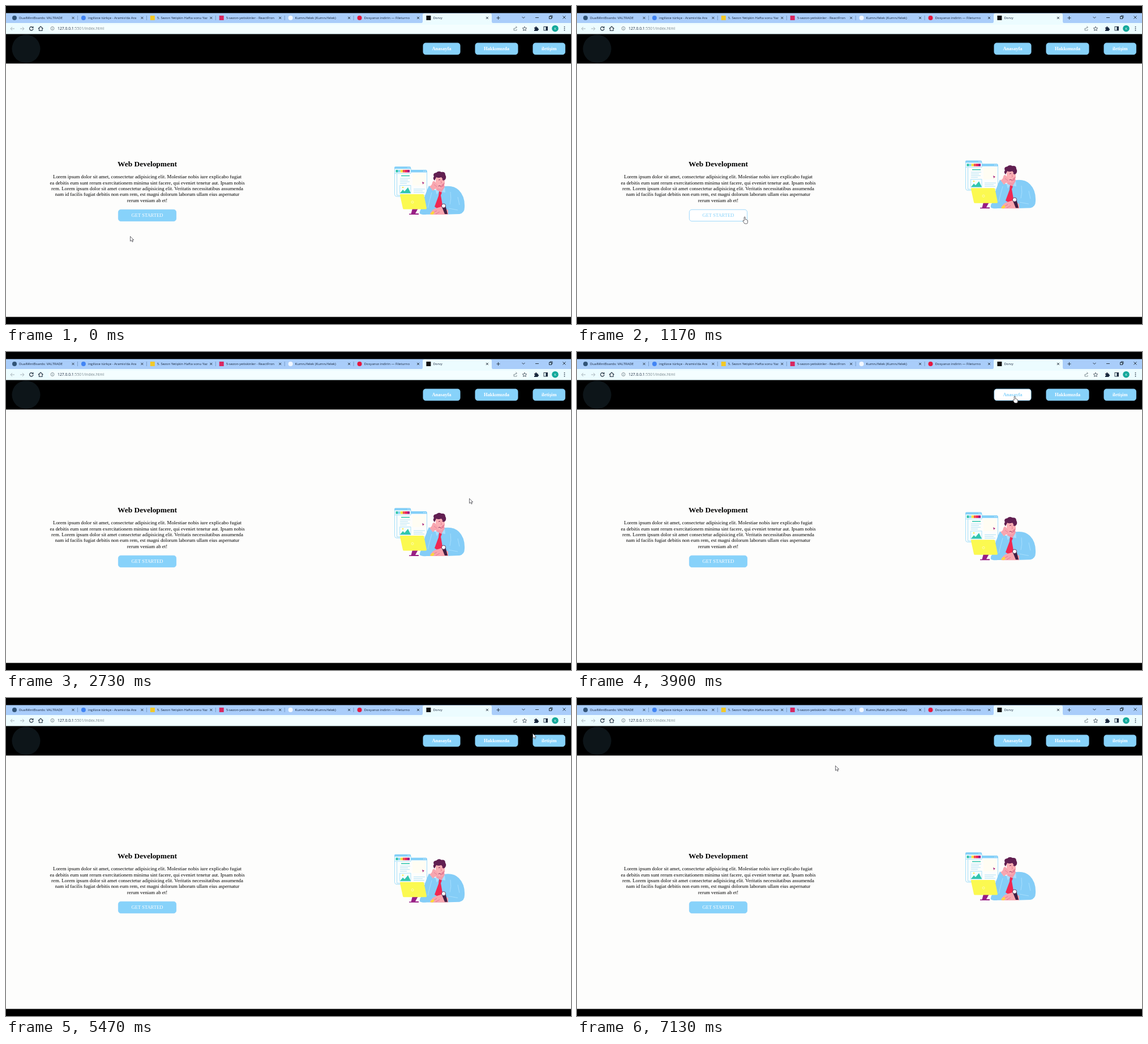
Write an HTML page that moves like this. It is 998 by 561 pixels and loops after 7.16 s.

```html
<!DOCTYPE html>
<html lang="tr">
<head>
<meta charset="utf-8">
<style>
html, body { margin: 0; width: 100%; height: 100%; overflow: hidden; background: #000; }
svg { display: block; width: 100vw; height: 100vh; }
text { white-space: pre; }
.ui { font: 6px "Open Sans", "Noto Sans", sans-serif; fill: #17263c; }
.serif { font-family: "Liberation Serif", "Times New Roman", serif; text-anchor: middle; }
.line { fill: none; stroke: #2c3a48; stroke-width: 1; }
</style>
</head>
<body>
<svg id="stage" viewBox="0 0 998 561">
  <rect width="998" height="561"/>
  <rect y="12.5" width="998" height="18" fill="#a9cdfa"/>
  <path d="M733 30.5Q736 30 736 27V16Q736 13 739 13H855Q858 13 858 16V27Q858 30 861 30.5Z" fill="#ecfcff"/>
  <rect y="30" width="998" height="19.500" fill="#ecfcff"/>
  <rect x="75" y="33" width="850" height="14" rx="7" fill="#f4feff"/>
  <g id="tabs"></g>

  <g class="line">
    <path d="M866.500 21h6M869.500 18v6M911.500 19l2.500 2.500 2.500-2.500M935 20.500h6M983.500 17.500l5 5m0-5l-5 5"/>
    <rect x="959.500" y="18.500" width="4" height="4"/>
    <path d="M961 18v-1h4v4h-1"/>
    <path d="M15 40H8m3-3l-3 3 3 3M25 40h7m-3-3l3 3-3 3" stroke="#a7b3ba"/>
    <path d="M47 37.500a3.200 3.200 0 1 0 1 2.500M48 36v2.500h-2.500" stroke-width="1.200"/>
    <path d="M57 40l4.200-4 4.200 4M58.500 39v4.500h5.500V39" stroke-width="1.100"/>
    <g stroke="#6d7b82" stroke-width=".8">
      <circle cx="82" cy="39.500" r="3"/><path d="M82 39v2.200M82 37.500v.8"/>
      <path d="M897 39v4h5v-2M898 41q0-3 4-3.500m-1.500-2l2 2-2 2"/>
    </g>
    <path d="M916 36.300l1.100 2.400 2.600.3-1.900 1.800.5 2.600-2.300-1.300-2.300 1.300.5-2.600-1.900-1.800 2.600-.3Z" stroke-width=".8"/>
    <rect x="950" y="36.500" width="6.500" height="6.500"/>
  </g>
  <path d="M933 38h2q0-2 1.300-2t1.300 2h2v2q1.600 0 1.600 1.300t-1.600 1.300v1.400h-6.600v-2q1.500-.2 1.500-1.300t-1.500-1.300ZM953.500 36.500h3V43h-3Z" fill="#17263c"/>
  <g fill="#2c3a48"><circle cx="986.500" cy="36.800" r=".9"/><circle cx="986.500" cy="39.800" r=".9"/><circle cx="986.500" cy="42.800" r=".9"/></g>
  <circle cx="970" cy="39.700" r="5.800" fill="#13a89a"/>
  <text x="970" y="42" class="ui" style="fill:#fff" text-anchor="middle">K</text>
  <text x="91" y="42.200" class="ui" style="font-size:6.800px">127.0.0.1<tspan fill="#76848b">:5501/index.html</tspan></text>

  <circle cx="35.500" cy="75.500" r="25" fill="#0d1519"/>
  <rect y="101.500" width="998" height="447" fill="#fdfdfc"/>
  <text class="serif" x="249.500" y="283" font-size="13.450" font-weight="bold">Web Development</text>
  <g id="copy" class="serif" font-size="8.830"></g>
  <g id="buttons" class="serif"></g>

  <g id="scene">
    <g stroke="#8bd6f8" stroke-width=".8" fill="#fdfdfc">
      <path d="M686.500 275H715V325H690q-3.500 0-3.500-4Z"/>
      <path d="M690.500 280H743.500V323H690.500Z"/>
    </g>
    <path d="M686 276v-2q0-1.800 2-1.800h25q2 0 2 1.800v2ZM715 282.500V278h26.500q2 0 2 2v2.500Z" fill="#83cff8"/>
    <g fill="#fff"><circle cx="710" cy="274" r=".6"/><circle cx="712.300" cy="274" r=".6"/><circle cx="738" cy="280.300" r=".7"/><circle cx="740.800" cy="280.300" r=".7"/></g>
    <rect x="686.500" y="276" width="28.500" height="8.500" fill="#fff" stroke="#8bd6f8" stroke-width=".7"/>
    <g id="swatches"></g>
    <path d="M718 284.500h23v21h-23Z" fill="#fffdf3"/>
    <path d="M698 288.500h15" stroke="#31c6ae" stroke-width="1.600"/>
    <path d="M696 293h18M696 296h14M696 299h17M696 302h12M720 312h20M720 315h16M720 318h19" stroke="#a6dff5" stroke-width=".9"/>
    <path d="M695.500 305.500h19.500v14h-19.500Z" fill="#f5fdff" stroke="#8bd6f8" stroke-width=".7"/>
    <path d="M696 319l5-6 3 3 6-7 5 10Z" fill="#31c6ae"/>
    <circle cx="701" cy="309" r="1.300" fill="#ffe94f"/>
    <path d="M735 299l4 2-1.800 1-.7 2Z" fill="#a21b75"/>

    <path d="M731 355q-1-5 3-9 4-20 13-40l11 8 17-7q16-2 25 7 11 11 10 30 0 10-9 12l-25 .8h-33q-9 1-12-1.800Z" fill="#84cdf7"/>
    <path d="M752 318q-4 14-7 27M785 317q2 12-1 22M798 326l3 14M782 346l16 3" stroke="#b5e5ff" stroke-width=".7" fill="none"/>
    <path d="M760 306l14-2 1 5-6 9-9-4Z" fill="#f39bab"/>
    <path d="M759 290q8-3 15 0l1 10q-1 8-6 11-7 1-10-6Z" fill="#fbb0b5"/>
    <path d="M775 301q-6 2-8 9l6-3Z" fill="#e88098"/>
    <path d="M757 297q-4-4-1-7-3-6 4-7 4-4 9-1 7-1 7 5 3 5-1 9l-3 1q-1-4-3-6-5 2-9 0Z" fill="#611f51"/>
    <path d="M764 296l3-.8m3 .3l2-.5M763 307q3-2 5 0" stroke="#7a2354" stroke-width=".9" fill="none"/>
    <path d="M768 297l1.500 4-2 .5" stroke="#df708a" stroke-width=".8" fill="none"/>
    <path d="M748 307q4-1 5-6 1-4 4-3l3 4 5 6-2 3-6 1-3 3Z" fill="#f8a6af"/>
    <path d="M756 304l5 4" stroke="#df708a" stroke-width=".7"/>
    <path d="M765 316l5 2-2 5 3 17-5 9-9-6 7-19Z" fill="#ef2852"/>
    <path d="M758 312l7 4-4 6ZM770 317l5-9 1 10Z" fill="#a9defc"/>
    <path d="M749 355q4-7 10-9l10-3 12 6v8h-31Z" fill="#f8a6af"/>
    <path d="M754 354l7-4M759 356l7-4" stroke="#df708a" stroke-width=".8"/>
    <path d="M769 341l7-1 4 16h-5Z" fill="#431e43"/>
    <circle cx="773" cy="341.500" r="3.600" fill="#fff" stroke="#431e43" stroke-width=".8"/>
    <path d="M749 356l5-5 3 2-3 4Z" fill="#fbdc35"/>

    <path d="M718 346h10l-5 9h6v2h-17v-1.500h3.500Z" fill="#981f85"/>
    <path d="M697 321h39.500q1.500 0 1.800 1.500l4.700 23q.3 2-1.800 2H703q-1.700 0-2-1.500l-5-23q-.5-2 1-2Z" fill="#fbf950"/>
    <circle cx="718" cy="335" r="2" fill="none" stroke="#fffbb0"/>
  </g>

  <g id="cursor" fill="#fff" stroke="#2b2b33" stroke-width=".7" stroke-linejoin="round">
    <path id="arrow" d="M.5 .5V9l2-1.800 1.500 3 1.400-.7L4 6.700h2.700Z"/>
    <path id="hand" d="M-.8 7V1Q-.8 0 .2 0T1.200 1V4.500Q2.500 3.800 2.900 5 4.200 4.500 4.500 5.800 5.500 5.500 5.500 7V9Q5.500 10.500 4.500 12H0L-2.700 8Q-3.500 6.500-2 6.500Z"/>
  </g>
</svg>
<script>
const LOOP = 7160, FADE = 200, SKY = [135, 210, 250], WHITE = [255, 255, 255];
const el = id => document.getElementById(id);

const tabs = [
  ["DualMintBoards: VALTRADE", "#315477"],
  ["ingilizce türkçe - Aramio'da Ara", "#4285f4"],
  ["5. Sezon Yetişkin Hafta sonu Yaz", "#f2c928", true],
  ["5-sezon-yetiskinler - ReactFron", "#d92761", true],
  ["KumruYelek (KumruYelek)", "#f3f8ff"],
  ["Dosyanızı indirin — Fileturno", "#e5173f"],
  ["Dorvy", "#111", true]
];
el("tabs").innerHTML = tabs.map(([label, color, square], i) => {
  const x = 15 + 121.9 * i;
  const icon = square
    ? `<rect x="${x - 4}" y="17" width="8" height="8" fill="${color}"/>`
    : `<circle cx="${x}" cy="21" r="4" fill="${color}"/>`;
  const divider = i < 5 ? `<path d="M${x + 111.5} 17v8" stroke="#6d91bd" stroke-width=".8"/>` : "";
  return `${icon}<text class="ui" x="${x + 8}" y="23.2">${label}</text>${divider}
    <path d="M${x + 101.5} 19l4 4m0-4l-4 4" class="line"/>`;
}).join("");

el("copy").innerHTML = [
  "Lorem ipsum dolor sit amet, consectetur adipisicing elit. Molestiae nobis iure explicabo fugiat",
  "ea debitis eum sunt rerum exercitationem minima sint facere, qui eveniet tenetur aut. Ipsam nobis",
  "rem. Lorem ipsum dolor sit amet consectetur adipisicing elit. Veritatis necessitatibus assumenda",
  "nam id facilis fugiat debitis non eum rem, est magni dolorum laborum ullam eius aspernatur",
  "rerum veniam ab et!"
].map((line, i) => `<text x="249.5" y="${304.2 + 10.4 * i}">${line}</text>`).join("");

el("swatches").innerHTML = ["#2fc4ad", "#8bd6f8", "#f7e43c", "#f0504e", "#e8215c", "#981f85"]
  .map((c, i) => `<rect x="${688.5 + 4.1 * i}" y="278" width="4.1" height="4.6" fill="${c}"/>`).join("");

const buttons = [
  { label: "Anasayfa", x: 736.5, y: 65, w: 66, weight: "bold" },
  { label: "Hakkımızda", x: 828.5, y: 65, w: 76, weight: "bold" },
  { label: "iletişim", x: 930.5, y: 65, w: 57.5, weight: "bold" },
  { label: "GET STARTED", x: 198, y: 359, w: 103, weight: "normal" }
];
el("buttons").innerHTML = buttons.map(({ label, x, y, w, weight }) =>
  `<g><rect x="${x + .4}" y="${y + .2}" width="${w - .8}" height="20.4" rx="4.5" stroke="#87cefa" stroke-width=".8"/>
   <text x="${x + w / 2}" y="${y + 13.4}" font-size="8.55" font-weight="${weight}">${label}</text></g>`).join("");
buttons.forEach((b, i) => [b.box, b.text] = el("buttons").children[i].children);

// time, x, y
const path = [
  [0, 219, 406], [250, 222, 410], [600, 240, 395], [900, 275, 381], [1170, 296, 372],
  [1500, 291, 370], [1900, 285, 366], [2150, 330, 345], [2730, 817.5, 258], [3000, 820, 246],
  [3500, 792, 112], [3750, 775, 82], [3900, 773, 78], [4350, 785, 78], [4700, 850, 76],
  [5050, 880, 74], [5470, 930, 62], [5700, 942, 68], [6530, 949, 67], [6640, 949, 67],
  [6720, 944, 92], [7130, 456, 119], [LOOP, 456, 119]
];

function pointer(t) {
  const i = path.findIndex(p => p[0] > t);
  const [t0, x0, y0] = path[i - 1], [t1, x1, y1] = path[i];
  const k = (t - t0) / (t1 - t0);
  return [x0 + (x1 - x0) * k, y0 + (y1 - y0) * k];
}

const inside = (b, [x, y]) => x >= b.x && x <= b.x + b.w && y >= b.y && y <= b.y + 21;

// Share of the last FADE ms spent over the button
function hover(b, t) {
  let hits = 0;
  for (let k = 0; k < 10; k++) hits += inside(b, pointer(Math.max(0, t - k * FADE / 10)));
  return hits / 10;
}

const mix = (a, b, k) => `rgb(${a.map((v, i) => Math.round(v + (b[i] - v) * k))})`;

function draw(t) {
  const at = pointer(t);
  const over = buttons.some(b => inside(b, at));
  for (const b of buttons) {
    const k = hover(b, t);
    b.box.setAttribute("fill", mix(SKY, WHITE, k));
    b.text.setAttribute("fill", mix(WHITE, SKY, k));
  }
  el("cursor").setAttribute("transform", `translate(${at.map(Math.round)})`);
  el("arrow").setAttribute("display", over ? "none" : "inline");
  el("hand").setAttribute("display", over ? "inline" : "none");
  const lift = 5.6 * (1 - Math.cos(Math.PI * (t - 1085) / 1000));
  el("scene").setAttribute("transform", `translate(0 ${lift.toFixed(2)})`);
}

const start = performance.now();
function tick() {
  draw((performance.now() - start) % LOOP);
  requestAnimationFrame(tick);
}
tick();
</script>
</body>
</html>
```
